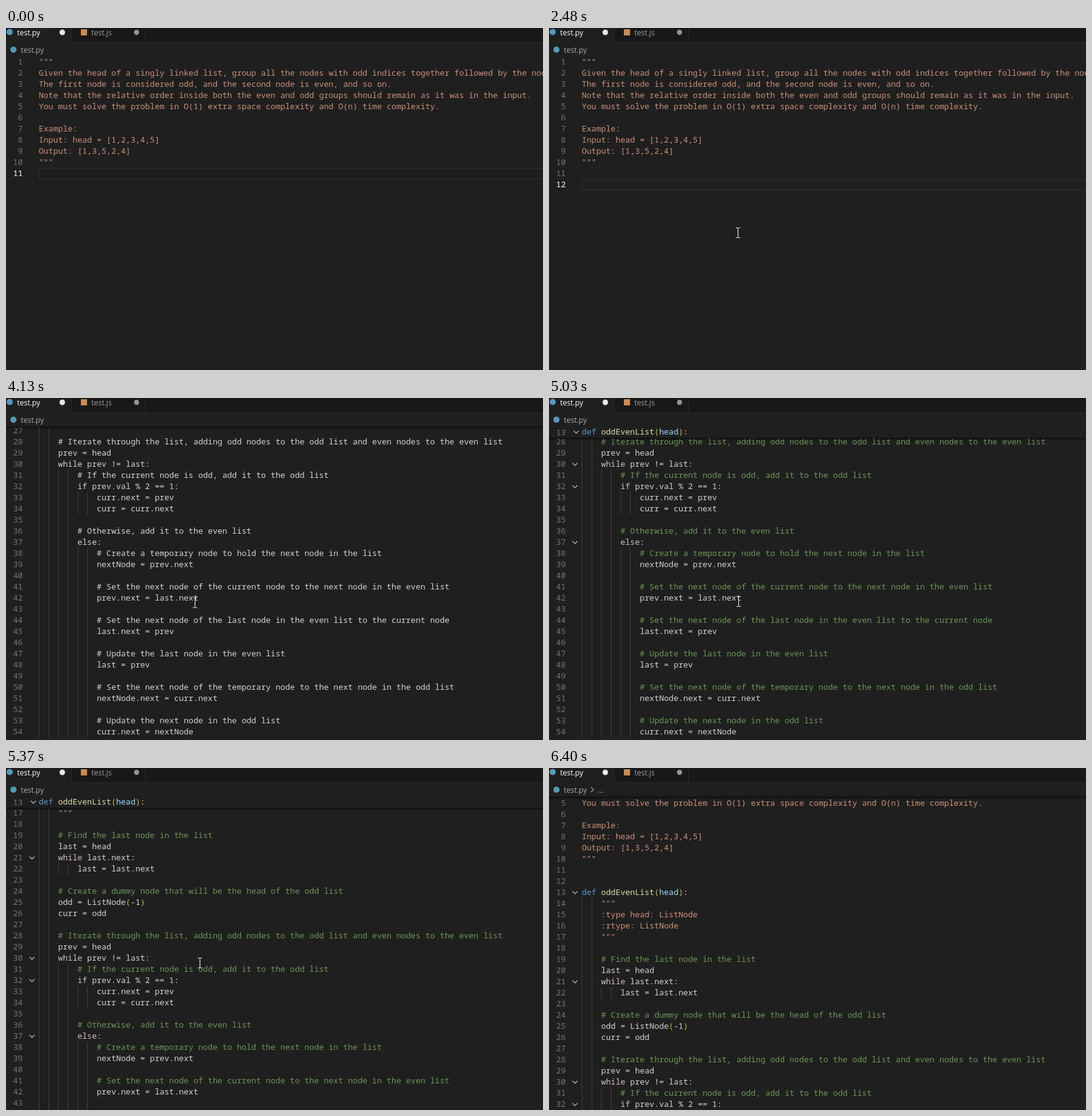
Write an HTML page with a canvas that moves like this. It is 868 px wide and 552 px high and loops after 6800 ms.

```html
<!DOCTYPE html>
<html lang="en">
<head>
<meta charset="utf-8">
<style>
  html, body { margin: 0; width: 100%; height: 100%; overflow: hidden; background: #1f1f1f; }
  canvas { display: block; }
</style>
</head>
<body>
<canvas id="stage" width="868" height="552"></canvas>
<script>
const LOOP = 6800, W = 868, H = 552, ROW = 18, TOP = 46, LEFT = 53;
const MONO = '13.02px "Noto Sans Mono", monospace';
const SANS = '12px "Open Sans", sans-serif';
const PLAIN = '#d4d4d4', STRING = '#ce9178', BG = '#1f1f1f';
const ctx = document.getElementById('stage').getContext('2d');

const lines = `"""
Given the head of a singly linked list, group all the nodes with odd indices together followed by the nodes with even indices.
The first node is considered odd, and the second node is even, and so on.
Note that the relative order inside both the even and odd groups should remain as it was in the input.
You must solve the problem in O(1) extra space complexity and O(n) time complexity.

Example:
Input: head = [1,2,3,4,5]
Output: [1,3,5,2,4]
"""


def oddEvenList(head):
    """
    :type head: ListNode
    :rtype: ListNode
    """

    # Find the last node in the list
    last = head
    while last.next:
        last = last.next

    # Create a dummy node that will be the head of the odd list
    odd = ListNode(-1)
    curr = odd

    # Iterate through the list, adding odd nodes to the odd list and even nodes to the even list
    prev = head
    while prev != last:
        # If the current node is odd, add it to the odd list
        if prev.val % 2 == 1:
            curr.next = prev
            curr = curr.next

        # Otherwise, add it to the even list
        else:
            # Create a temporary node to hold the next node in the list
            nextNode = prev.next

            # Set the next node of the current node to the next node in the even list
            prev.next = last.next

            # Set the next node of the last node in the even list to the current node
            last.next = prev

            # Update the last node in the even list
            last = prev

            # Set the next node of the temporary node to the next node in the odd list
            nextNode.next = curr.next

            # Update the next node in the odd list
            curr.next = nextNode`.split('\n');

// Blank lines take the smaller indent of their nearest neighbours.
const indents = lines.map((line, i) => {
  if (line) return line.search(/\S/);
  const before = lines.slice(0, i).reverse().find(Boolean);
  const after = lines.slice(i).find(Boolean);
  return Math.min(before.search(/\S/), after.search(/\S/));
});

const TOKENS = /(#.*|\bdef\b|\b(?:while|if|else)\b|oddEvenList|(?<=\()head|[()])/;

function tokenColor(token, odd) {
  if (!odd) return PLAIN;
  if (token[0] === '#') return '#6a9955';
  return { def: '#569cd6', oddEvenList: '#dcdcaa', head: '#9cdcfe', '(': '#d7ba4a', ')': '#d7ba4a' }[token] || '#d2bfce';
}

function text(str, x, y, color, font = MONO, align = 'left') {
  ctx.font = font;
  ctx.fillStyle = color;
  ctx.textAlign = align;
  ctx.fillText(str, x, y);
}

function box(x, y, w, h, color) {
  ctx.fillStyle = color;
  ctx.fillRect(x, y, w, h);
}

function dot(x, y, r, color) {
  ctx.fillStyle = color;
  ctx.beginPath();
  ctx.arc(x, y, r, 0, 7);
  ctx.fill();
}

function stroke(points, color, width = 1.1) {
  ctx.strokeStyle = color;
  ctx.lineWidth = width;
  ctx.beginPath();
  points.forEach(([x, y], i) => i ? ctx.lineTo(x, y) : ctx.moveTo(x, y));
  ctx.stroke();
}

function shadow(y) {
  const fade = ctx.createLinearGradient(0, y, 0, y + 5);
  fade.addColorStop(0, 'rgba(0,0,0,.55)');
  fade.addColorStop(1, 'rgba(0,0,0,0)');
  box(0, y, W, 5, fade);
}

const foldMark = (x, y) => stroke([[x - 4, y - 2], [x, y + 2], [x + 4, y - 2]], '#c5c5c5');

function codeLine(i, y, colored) {
  const line = lines[i];
  if (i < 10 || (colored && i > 12 && i < 17)) return text(line, LEFT, y, STRING);
  if (!colored) return text(line, LEFT, y, PLAIN);
  let x = LEFT;
  line.split(TOKENS).forEach((part, k) => {
    text(part, x, y, tokenColor(part, k % 2));
    x += ctx.measureText(part).width;
  });
}

function caretOn(t) {
  const flips = [480, 960, 1130, 1510, 2000, 2480, 2960, 3440, 3900, 4130];
  return flips.filter(at => t >= at).length % 2 === 1;
}

function scrollAt(t) {
  if (t < 4130) return 0;
  return 470 - 100 * [5310, 5340, 5750, 5780].filter(at => t >= at).length;
}

function editor(t, scroll) {
  const inserted = t >= 4130, colored = t >= 4160;
  const current = t < 1130 ? 10 : 11;
  const count = inserted ? lines.length : current + 1;
  for (let i = 0; i < count; i++) {
    const y = TOP + i * ROW - scroll;
    if (y < TOP - ROW || y > H) continue;
    const active = !inserted && i === current;
    if (active) {
      ctx.strokeStyle = '#303030';
      ctx.lineWidth = 1;
      ctx.strokeRect(LEFT + .5, y + .5, W, ROW - 1);
    }
    for (let col = 0; col < indents[i]; col += 2)
      box(Math.round(LEFT + col * 7.8125), y, 1, ROW, '#404040');
    text(i + 1, 27, y + 13, active ? '#ffffff' : '#6e7681', MONO, 'right');
    codeLine(i, y + 13, colored);
    if (t >= 4260 && i > 11 && lines[i].endsWith(':')) foldMark(42, y + 9);
    if (active && caretOn(t)) box(LEFT, y, 2, ROW, '#aeafad');
  }
}

function suggestions(t) {
  if (t < 2580 || t >= 4130) return;
  box(53, 262, 432, 22, '#454545');
  box(54, 263, 430, 20, '#04395e');
  text('abc', 57, 275, '#ffffff', '600 9px "Open Sans", sans-serif');
  text('The bard sings:', 76, 276, '#ffffff');
  if (t < 2680) return;
  box(484, 262, 332, 300, '#454545');
  box(485, 263, 330, 300, '#202020');
  lines.slice(12, 28).forEach((line, i) => {
    const short = line.length > 38 ? line.slice(0, 37) + '…' : line;
    text(short, 490, 279 + i * ROW, '#a3a3a3');
  });
  box(805, 263, 10, 187, '#424242');
  ctx.globalAlpha = Math.min(1, Math.max(0, (t - 2960) / 160));
  stroke([[800, 272], [808, 280]], '#d8d8d8');
  stroke([[808, 272], [800, 280]], '#d8d8d8');
  ctx.globalAlpha = 1;
}

function header(t, scroll) {
  box(0, 0, W, TOP, BG);
  box(106, 0, W, 23, '#181818');
  box(105, 23, W, 1, '#2b2b2b');
  box(105, 0, 1, 23, '#2b2b2b');
  box(225, 0, 1, 23, '#2b2b2b');
  dot(6, 6.5, 5, '#519aba');
  text('test.py', 18, 12, '#ffffff', SANS);
  dot(91, 7, 4.5, '#e8e8e8');
  box(121, 2, 10, 10, '#cb8b52');
  text('test.js', 138, 12, '#9d9d9d', SANS);
  dot(211, 7, 4.2, '#9b9292');
  dot(12, 35, 5, '#519aba');
  text('test.py', 24, 40, '#a9a9a9', SANS);
  if (t >= 6200) {
    stroke([[68, 31], [72, 35], [68, 39]], '#a9a9a9');
    text('...', 78, 40, '#a9a9a9', SANS);
  }
  if (t >= 4440 && t < 5750) {
    box(0, TOP, W, ROW + 1, BG);
    text(13, 27, 60, '#6e7681', MONO, 'right');
    foldMark(44, 55);
    codeLine(12, 59, true);
    shadow(TOP + ROW);
  } else if (scroll) {
    shadow(TOP);
  }
}

function pointer(t) {
  if (t < 160 || t >= 6380) return;
  // start, end, from, to, easing
  const moves = [
    [160, 540, [727, 535], [305, 330], p => 1 - (1 - p) ** 2],
    [5000, 5280, [305, 330], [313, 314], p => p],
    [6050, 6380, [313, 314], [755, 537], p => p * p * (3 - 2 * p)],
  ];
  const [start, end, from, to, ease] = moves.filter(m => t >= m[0]).pop();
  const p = ease(Math.min(1, (t - start) / (end - start)));
  const [x, y] = from.map((v, k) => Math.round(v + (to[k] - v) * p));
  box(x, y - 7, 1, 15, '#ffffff');
  for (const edge of [y - 8, y + 8]) {
    box(x - 3, edge, 3, 1, '#ffffff');
    box(x + 1, edge, 3, 1, '#ffffff');
  }
}

function draw(now) {
  const t = now % LOOP, scroll = scrollAt(t);
  box(0, 0, W, H, BG);
  editor(t, scroll);
  suggestions(t);
  header(t, scroll);
  pointer(t);
  requestAnimationFrame(draw);
}
requestAnimationFrame(draw);
</script>
</body>
</html>
```
